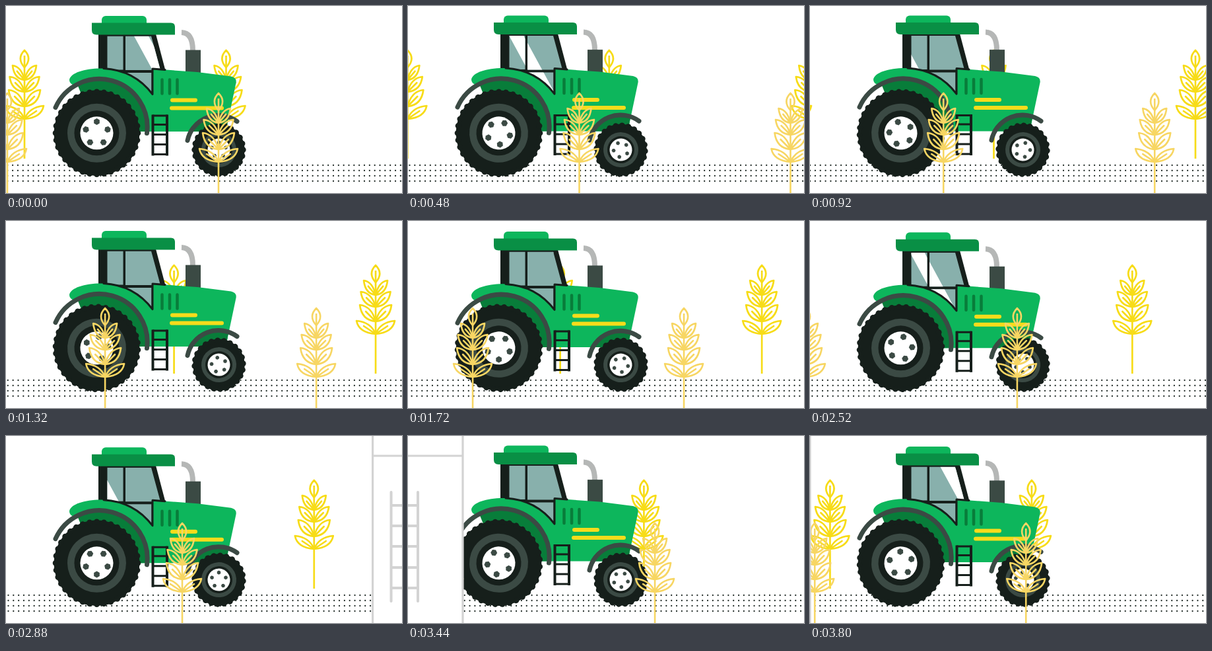
Write an HTML page that moves like this. It is 600x283 px and loops after 3.84 s.

```html
<!DOCTYPE html>
<html lang="en">
<head>
<meta charset="utf-8">
<title>Tractor</title>
<style>
  html, body { margin: 0; width: 100%; height: 100%; overflow: hidden; background: #fff; }
  svg { display: block; width: 600px; height: 283px; }
  .line { fill: none; stroke-linecap: round; stroke-linejoin: round; }
</style>
</head>
<body>
<svg viewBox="0 0 600 283">
  <defs>
    <g id="ear" class="line"></g>
    <clipPath id="panes">
      <path d="M153.5 46H177.5V97H153.5ZM181 46H220L234 97.5H181ZM181 101.5H220.5V134H181Z"/>
    </clipPath>
  </defs>

  <g id="back" stroke="#f7dc18" stroke-width="2.7"></g>
  <path id="ground" class="line" stroke="#26302c" stroke-width="2.3" stroke-dasharray="0 7.837"
    d="M-13.4 241H616M-13.4 249H616M-13.4 257H616M-13.4 265H616"/>

  <g id="body">
    <path d="M266 40.5Q283 41 283 68" fill="none" stroke="#b5b7b6" stroke-width="8"/>
    <path d="M272 67H295V104H272Z" fill="#3b4a44"/>
    <!-- cab -->
    <path d="M140 43H227L241.5 98V136H221L140 100Z" fill="#161f1b"/>
    <g clip-path="url(#panes)">
      <path d="M150 44H240V136H150Z" fill="#88b0ac"/>
      <path id="shine" d="M-22 46H0L49 136H27Z" fill="#fff"/>
    </g>
    <rect x="145" y="15.5" width="68" height="20" rx="6" fill="#0db65c"/>
    <path d="M130 26H250Q256 26 256 32V44H137Q130 44 130 37Z" fill="#098f45"/>
    <!-- hull -->
    <path d="M96 112C98 101 122 94 148 95C184 97 206 113 222 134V95.5L290 100.5L341 107Q350 109 348.5 117L335 181Q333 190.5 324 190.5H190L112 122Q96 121 96 112Z" fill="#0db65c"/>
    <path d="M148 95C184 97 206 113 222 134V95.5L241 97" class="line" stroke="#161f1b" stroke-width="3"/>
    <path d="M108 119A72.7 72.7 0 0 1 213.8 190.5H137Z" fill="#087d3a"/>
    <path d="M276 190.5A48 48 0 0 1 337 169L335 181Q333 190.5 324 190.5Z" fill="#087d3a"/>
    <path d="M236.5 112V133M248 112V133M259.5 112V133" class="line" stroke="#087d3a" stroke-width="4.5"/>
    <path d="M252 143H287M251 155H327" class="line" stroke="#f6dc1b" stroke-width="6"/>
    <path d="M222.5 165V227M244 165V227" stroke="#161f1b" stroke-width="4"/>
    <path d="M222 166.5H245M222 180H245M222 195H245M222 210H245M222 225H245" stroke="#161f1b" stroke-width="3"/>
    <path d="M75 154A72.7 72.7 0 0 1 213.5 193M275 204A48 48 0 0 1 350 175" class="line" stroke="#3b4a44" stroke-width="7"/>
  </g>

  <g id="wheels"></g>
  <g id="front" stroke="#f7d663" stroke-width="2.6"></g>

  <g id="panel">
    <path d="M0 -5H620V290H0Z" fill="#fff"/>
    <path d="M0 -5V290M620 -5V290M0 30H620" class="line" stroke="#d3d3d3" stroke-width="3.2"/>
    <path d="M28 85V250M552 85V250M28 105H552M28 136H552M28 167H552M28 199H552M28 230H552" class="line" stroke="#d3d3d3" stroke-width="4"/>
  </g>
</svg>
<script>
const LOOP = 3840, STEP = 40, WIPE = 2520, SWAP = 3180;
const $ = id => document.getElementById(id);
const mod = (a, n) => ((a % n) + n) % n;
const move = (el, x, y = 0) => el.setAttribute('transform', `translate(${x} ${y})`);

// Ear of wheat: top grain, then pairs of [half width, tip y, base y]
const pairs = [[18, 24, 46], [22.5, 41, 64], [24, 61, 86], [29, 85, 105]];
let ear = 'M0 1C-8 9 -8 18 0 27C8 18 8 9 0 1';
for (const [w, tip, base] of pairs)
  for (const s of [-1, 1])
    ear += `M0 ${base}Q${s * w * .88} ${base - 2} ${s * w} ${tip}Q${s * w * .25} ${tip + 2} 0 ${base}L${s * w * .62} ${tip + (base - tip) * .4}`;
$('ear').innerHTML = `<path d="${ear}"/>`;

function row(id, top, stem) {
  const g = $(id);
  g.innerHTML = `<g><use href="#ear"/><path d="M0 9V${stem}"/></g>`.repeat(3);
  return (x, gap) => [...g.children].forEach((el, i) => move(el, mod(x + 40, gap) - 40 + i * gap, top));
}
const backRow = row('back', 66, 165);
const frontRow = row('front', 131, 156);

function wheel(x, y, r, ring, inner, hub, orbit, bolt, lugs) {
  const disc = (rad, fill) => `<circle r="${rad}" fill="${fill}"/>`;
  const hex = [0, 1, 2, 3, 4, 5].map(i =>
    [bolt * Math.sin(i * Math.PI / 3), bolt * Math.cos(i * Math.PI / 3) - orbit]).join(' ');
  let s = disc(r - 2, '#161f1b') +
    `<circle r="${r - 4.5}" class="line" stroke="#161f1b" stroke-width="9" pathLength="${lugs}" stroke-dasharray="0 1"/>` +
    disc(ring, '#3b4a44') + disc(inner, '#161f1b') + disc(hub, '#fff');
  for (let a = 0; a < 360; a += 72)
    s += `<polygon points="${hex}" fill="#3b4a44" transform="rotate(${a})"/>`;
  const g = document.createElementNS('http://www.w3.org/2000/svg', 'g');
  g.innerHTML = s;
  $('wheels').append(g);
  return a => g.setAttribute('transform', `translate(${x} ${y}) rotate(${a})`);
}
const rear = wheel(137.5, 192.3, 66.8, 44.5, 34, 25, 17.3, 5, 36);
const fore = wheel(322.5, 217.6, 41.2, 26.5, 20.5, 17, 11, 3.1, 24);

const quart = u => u < .5 ? 8 * u ** 4 : 1 - 8 * (1 - u) ** 4;

function draw(t) {
  // The scenery restarts while the panel covers the stage
  const p = t < SWAP ? t : t - LOOP;
  backRow(333.5 - .0598 * p, 305.5);
  frontRow(322 - .1302 * p, 320);
  $('ground').setAttribute('stroke-dashoffset', .1302 * p);
  move($('body'), 0, .5 + 1.5 * Math.cos((p - 285) / 440 * 2 * Math.PI));
  move($('shine'), 216 - .085 * (mod(p + 660, 2020) - 660));
  rear(.0625 * p);
  fore(.1 * p);
  const wiping = t >= WIPE;
  $('panel').style.display = wiping ? '' : 'none';
  if (wiping) move($('panel'), 610 - 1230 * quart((t - WIPE) / (LOOP - WIPE)));
}

const start = performance.now();
function tick() {
  const t = (performance.now() - start) % LOOP;
  draw(Math.floor(t / STEP) * STEP);
  requestAnimationFrame(tick);
}
tick();
</script>
</body>
</html>
```
